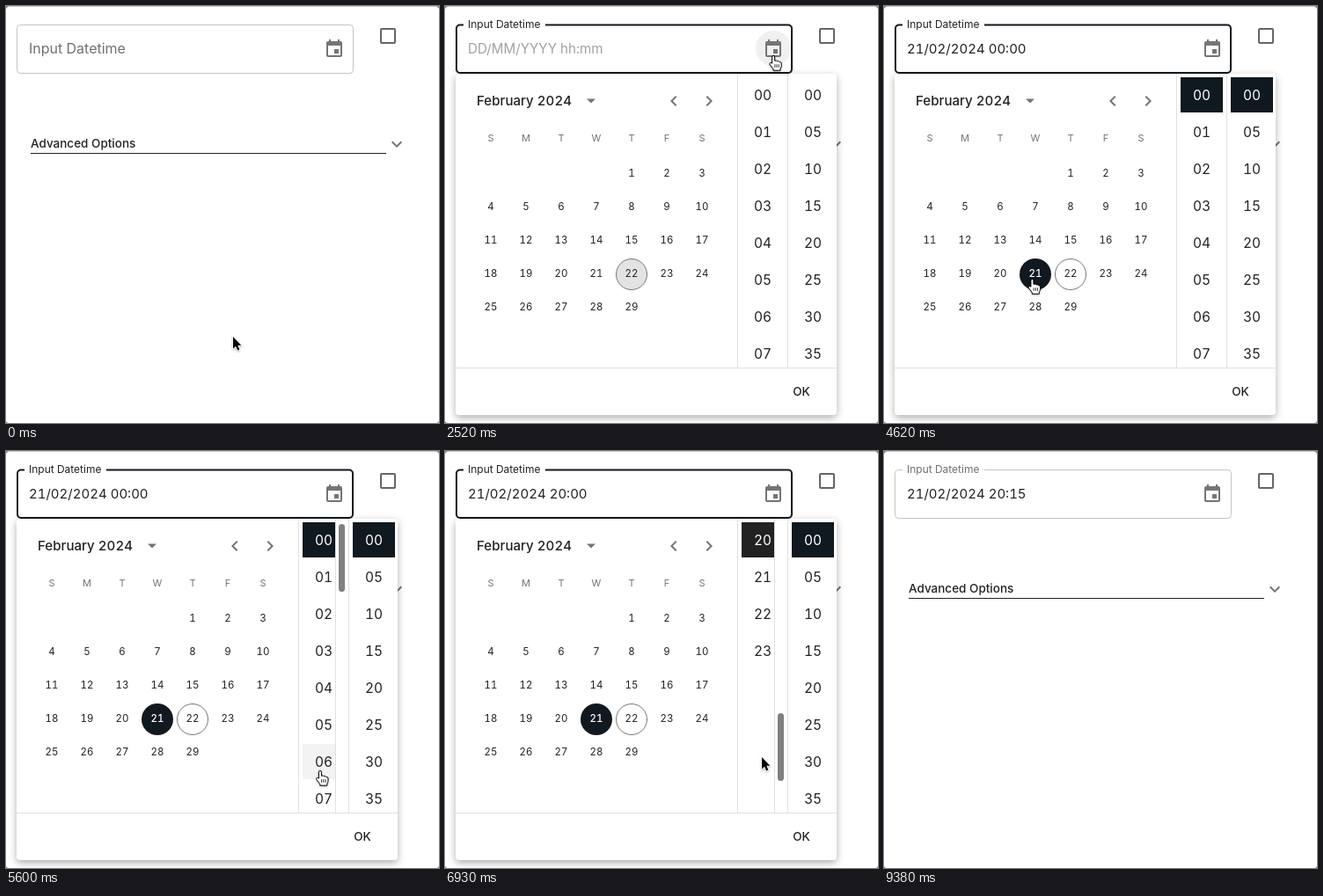
Animation, 492 px wide and 474 px high, one loop 9.73 s. Source, as an HTML page:

```html
<!DOCTYPE html>
<html lang="en">
<head>
<meta charset="utf-8">
<title>Datetime input</title>
<style>
  html, body { margin: 0; width: 100%; height: 100%; overflow: hidden; background: #fff; }
  svg { display: block; width: 492px; height: 474px; }
  text { font-family: Inter, sans-serif; font-variant-numeric: tabular-nums; fill: #222; white-space: pre; }
  .mid { text-anchor: middle; }
  .icon { fill: #757575; }
  .line { stroke: #e0e0e0; fill: none; }
  #paper { filter: drop-shadow(0 3px 4px rgba(0, 0, 0, .32)); }
  #popup { transform-origin: 228px 77px; }
  #arrow, #hand { filter: drop-shadow(0 1px 1px rgba(0, 0, 0, .3)); }
</style>
</head>
<body>
<svg id="stage" viewBox="0 0 492 474">
  <path d="M0 .5H492" stroke="#c4c4c4"/>
  <path d="M0 0H3L0 3ZM492 0H489L492 3ZM0 474V472L2 474ZM492 474V472L490 474Z" fill="#888"/>

  <rect id="field" fill="none"/>
  <rect id="notch" x="21" y="19" height="5" fill="#fff"/>
  <text id="label" font-size="16">Input Datetime</text>
  <text id="value" x="26" y="54"></text>
  <circle id="halo" cx="373" cy="48" r="20" fill-opacity=".06"/>
  <circle id="ripple" cx="373" cy="48"/>
  <path class="icon" transform="translate(361 37)" d="M17 12h-5v5h5zM16 1v2H8V1H6v2H5a2 2 0 0 0-2 2v14a2 2 0 0 0 2 2h14a2 2 0 0 0 2-2V5a2 2 0 0 0-2-2h-1V1zm3 18H5V8h14z"/>
  <rect x="426" y="26" width="16" height="16" rx="1" fill="none" stroke="#666" stroke-width="2"/>

  <text x="28" y="161" font-size="13.5" font-weight="500">Advanced Options</text>
  <path d="M28 167.5H432" stroke="#222"/>
  <path class="icon" transform="translate(432 145)" d="M16.59 8.59 12 13.17 7.41 8.59 6 10l6 6 6-6z"/>

  <g id="popup">
    <rect id="paper" x="12" y="77" width="433" height="388" rx="4" fill="#fff"/>
    <text x="36" y="113" font-size="15.1" font-weight="500">February 2024</text>
    <path class="icon" d="M161 105.5h10l-5 5z"/>
    <path class="icon" transform="translate(248 96)" d="M15.41 7.41 14 6l-6 6 6 6 1.41-1.41L10.83 12z"/>
    <path class="icon" transform="translate(288 96)" d="M10 6 8.59 7.41 13.17 12l-4.58 4.59L10 18l6-6z"/>
    <g id="month"></g>
    <g id="clock"></g>
    <path class="line" d="M12 411.5H445M332.5 77V411M389.5 77V411"/>
    <text class="mid" x="405" y="443" font-size="13.5" font-weight="500">OK</text>
  </g>

  <g id="cursor">
    <circle id="ring" r="28.8" fill="none" stroke="#000" stroke-width="3"/>
    <path id="arrow" d="M0 0V13.5L3.1 10.7 5.2 15.6 7.4 14.6 5.3 9.8H9.4Z" stroke="#fff" stroke-width="1.6" paint-order="stroke"/>
    <g id="hand" transform="translate(-.5 -.8)" stroke="#000" fill="#fff" stroke-linejoin="round">
      <path d="M-1.6 9V1.7a1.5 1.5 0 0 1 3 0V6q2.4-.9 2.8.6 2.3-.7 2.6.8 2.1-.3 2.2 1.4V11.5q0 2-1.2 3.5V17H-.2V15.5L-4.1 10.3q-.8-1.6.5-2 1-.2 2 .7Z"/>
      <path d="M1.6 10v3.6M3.8 10v3.6M6 10v3.6" stroke-width=".8"/>
    </g>
  </g>
</svg>
<script>
const LOOP = 9730, STEP = 70, INK = '#101820';
const $ = id => document.getElementById(id);

function set(el, attrs) {
  for (const k in attrs) el.setAttribute(k, attrs[k]);
  return el;
}
function add(parent, tag, attrs) {
  return parent.appendChild(set(document.createElementNS('http://www.w3.org/2000/svg', tag), attrs));
}
function addText(parent, x, cy, str, size, attrs = {}) {
  const el = add(parent, 'text', { class: 'mid', x, y: cy + size * .364, 'font-size': size, ...attrs });
  el.textContent = str;
  return el;
}
const show = (el, on) => set(el, { visibility: on ? 'visible' : 'hidden' });

// Eased 0..1 progress of t between a and b
function ease(t, a, b) {
  const p = Math.min(1, Math.max(0, (t - a) / (b - a)));
  return p * p * (3 - 2 * p);
}
const mix = (a, b, p) => a + (b - a) * p;
const within = (t, a, b) => t >= a && t < b;

// Calendar
[...'SMTWTFS'].forEach((d, i) =>
  addText($('month'), 52 + 40 * i, 150, d, 11, { style: 'fill:#757575' }));
const days = Array.from({ length: 29 }, (_, i) => {
  const slot = i + 4, x = 52 + 40 * (slot % 7), y = 190 + 38 * Math.floor(slot / 7);
  const disc = add($('month'), 'circle', { cx: x, cy: y + 1, r: 18, fill: 'none' });
  return { n: i + 1, x, y, disc, text: addText($('month'), x, y, i + 1, 11.5) };
});
const dayRipple = add($('month'), 'circle', { cx: 172, cy: 305, fill: '#fff' });

// Hour and minute lists
function makeColumn(x, width, count, step, thumbH, ratio) {
  const id = 'clip' + x;
  const clip = add(add($('clock'), 'clipPath', { id }), 'rect', { x, y: 77, height: 334 });
  const list = add(add($('clock'), 'g', { 'clip-path': `url(#${id})` }), 'g', {});
  const cells = Array.from({ length: count }, (_, i) => ({
    box: add(list, 'rect', { x: x + 4, y: 81 + 42 * i, width: 48, height: 40 }),
    text: addText(list, x + 28, 101 + 42 * i, String(i * step).padStart(2, '0'), 15.5)
  }));
  const bar = add($('clock'), 'g', {});
  add(bar, 'path', { class: 'line', d: `M${x + width - 14.5} 77V411` });
  const thumb = add(bar, 'rect', { x: x + width - 11, width: 7, height: thumbH, rx: 3.5, fill: '#808080' });
  return { x, width, clip, list, cells, bar, thumb, ratio };
}
const hours = makeColumn(333, 56, 24, 1, 77, .256);
const minutes = makeColumn(390, 55, 12, 5, 131, .414);
add(add(minutes.list, 'clipPath', { id: 'cell' }), 'rect', { x: 394, y: 207, width: 48, height: 40 });
const minuteRipple = add(minutes.list, 'circle', { cx: 418, cy: 227, fill: '#fff', 'clip-path': 'url(#cell)' });

const inColumn = (col, x, y) => within(x, col.x, col.x + col.width) && within(y, 77, 411);
function cellAt(col, x, y, scroll) {
  const pos = y - 81 + scroll, i = Math.floor(pos / 42);
  return inColumn(col, x, y) && pos - i * 42 <= 40 && col.cells[i] ? i : -1;
}
function drawColumn(col, scroll, selected, color, hover, barOn) {
  set(col.list, { transform: `translate(0 ${-scroll})` });
  set(col.clip, { width: barOn ? col.width - 15 : col.width });
  set(col.bar, { opacity: barOn ? 1 : 0 });
  set(col.thumb, { y: 83 + scroll * col.ratio });
  col.cells.forEach(({ box, text }, i) => {
    set(box, { fill: i === selected ? color : i === hover ? '#f3f3f3' : 'none' });
    text.style.fill = i === selected ? '#fff' : '#222';
  });
}

// Pointer path: time, x, y
const path = [
  [70, 258, 376], [1050, 377, 94], [1330, 378, 52], [2450, 378, 52],
  [3290, 162, 309], [4550, 162, 309], [5180, 367, 369], [5250, 367, 369],
  [5390, 367, 372], [5460, 367, 372], [5600, 357.5, 364], [6790, 357.5, 364],
  [6930, 360, 348], [7280, 412.5, 207], [7420, 412.5, 207], [7630, 415.5, 233.5],
  [8470, 415.5, 233.5], [9380, 276, 478]
];
const presses = [1610, 3850, 6510, 7770];

function pointer(t) {
  const i = path.findIndex(k => k[0] > t);
  if (i === 0) return path[0].slice(1);
  if (i < 0) return path[path.length - 1].slice(1);
  const a = path[i - 1], b = path[i], p = ease(t, a[0], b[0]);
  return [mix(a[1], b[1], p), mix(a[2], b[2], p)];
}

function drawField(t, x, y, overIcon) {
  const focus = within(t, 1960, 7920);
  const hover = within(x, 12, 395) && within(y, 21, 77);
  const w = focus ? 2 : 1;
  set($('field'), {
    x: 12 + w / 2, y: 21 + w / 2 - (focus ? .5 : 0), width: 383 - w, height: 56 - w + (focus ? .5 : 0), rx: 4,
    stroke: focus ? INK : hover ? '#212121' : '#c4c4c4', 'stroke-width': w
  });
  const p = ease(t, 1920, 2150);
  set($('notch'), { width: 93 * p });
  set($('label'), { transform: `translate(26 ${mix(54, 25, p)}) scale(${mix(1, .75, p)})` });
  $('label').style.fill = focus ? '#222' : '#707070';

  const empty = t < 3990;
  $('value').textContent = t < 1960 ? '' : empty ? 'DD/MM/YYYY hh:mm'
    : '21/02/2024 ' + (t < 6650 ? '00:00' : t < 7910 ? '20:00' : '20:15');
  $('value').style.fill = empty ? '#a2a2a2' : '#222';
  set($('value'), { 'font-size': empty ? 15.2 : 15, opacity: empty ? ease(t, 1960, 2160) : 1 });

  show($('halo'), overIcon);
  set($('ripple'), {
    r: mix(7, 20, ease(t, 1700, 2080)),
    'fill-opacity': t < 1750 ? 0 : .13 * (1 - ease(t, 1960, 2240))
  });
}

function drawDays(t, x, y) {
  const picked = ease(t, 3920, 4200);
  let hit = false;
  for (const { n, x: dx, y: dy, disc, text } of days) {
    const over = Math.hypot(x - dx, y - dy) < 18;
    hit = hit || over;
    const look = { fill: over ? '#f3f3f3' : 'none', 'fill-opacity': 1 };
    if (n === 21 && t >= 3990) Object.assign(look, { fill: INK, 'fill-opacity': picked });
    if (n === 22) {
      Object.assign(look, { stroke: '#757575', r: 17.5 });
      if (picked < 1) Object.assign(look, { fill: '#e3e3e3', 'fill-opacity': 1 - picked });
    }
    set(disc, look);
    if (n === 21) {
      text.style.fill = t >= 3990 ? '#fff' : '#222';
      text.style.fontWeight = t >= 3990 ? 500 : 400;
    }
  }
  set(dayRipple, { r: 18 * ease(t, 3920, 4300), opacity: .25 * (1 - ease(t, 4130, 4480)) });
  return hit;
}

function draw(t) {
  const [x, y] = pointer(t);
  const overIcon = Math.hypot(x - 373, y - 48) < 20;
  drawField(t, x, y, overIcon);

  const open = within(t, 1960, 8220);
  const shown = ease(t, 1920, 2220) * (1 - ease(t, 7916, 8216));
  const grown = ease(t, 1920, 2120) * (1 - ease(t, 8050, 8350));
  set($('popup'), { opacity: shown });
  $('popup').style.transform = `scale(${mix(.75, 1, grown)}, ${mix(.5625, 1, grown)})`;

  const onDay = drawDays(t, x, y);
  const hourScroll = 588 * ease(t, 5740, 6300) + 252 * ease(t, 6600, 6910);
  const minuteScroll = 126 * ease(t, 7900, 8180);
  const hour = cellAt(hours, x, y, hourScroll), minute = cellAt(minutes, x, y, minuteScroll);
  const picked = t >= 3990;
  drawColumn(hours, hourScroll, !picked ? -1 : t < 6650 ? 0 : 20,
    within(t, 6650, 7100) ? '#222' : INK, within(t, 6650, 6930) ? -1 : hour, inColumn(hours, x, y));
  drawColumn(minutes, minuteScroll, !picked ? -1 : t < 7910 ? 0 : 3,
    INK, t < 7910 ? minute : -1, inColumn(minutes, x, y));
  set(minuteRipple, { r: 31 * ease(t, 7840, 8150), opacity: .22 * (1 - ease(t, 8050, 8260)) });

  const hand = overIcon || open && (onDay || hour >= 0 || minute >= 0);
  set($('cursor'), { transform: `translate(${x} ${y})` });
  show($('hand'), hand);
  show($('arrow'), !hand);
  show($('ring'), presses.some(p => within(t, p, p + 140)));
}

const start = performance.now();
function tick() {
  const t = (performance.now() - start) % LOOP;
  draw(Math.floor(t / STEP) * STEP);
  requestAnimationFrame(tick);
}
tick();
</script>
</body>
</html>
```
